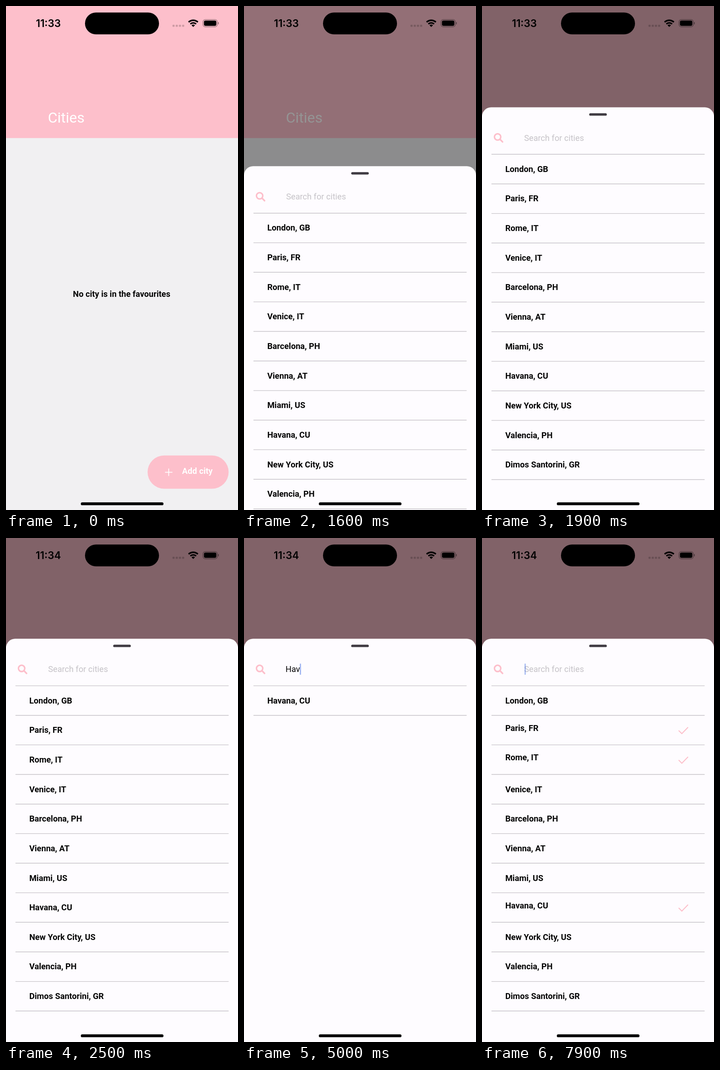
An HTML page with a canvas that plays this animation: 508x1102 px, repeating every 8 s.

```html
<!DOCTYPE html>
<html lang="en">
<head>
<meta charset="utf-8">
<title>Favourite cities</title>
<style>
  html, body { margin: 0; width: 100%; height: 100%; overflow: hidden; background: #f1f0f2; }
  canvas { display: block; width: 508px; height: 1102px; }
</style>
</head>
<body>
<canvas width="508" height="1102"></canvas>
<script>
const ctx = document.querySelector('canvas').getContext('2d');
const W = 508, H = 1102, LOOP = 8000;
const PINK = '#fdbfcb', INK = '#050505', PAPER = '#fefcff';
const SHEET_TOP = 220.3, ROW = 64.65;
const BOLD = '700 18.2px Roboto, sans-serif';
const REGULAR = '400 18.2px Roboto, sans-serif';
const CITIES = ['London, GB', 'Paris, FR', 'Rome, IT', 'Venice, IT', 'Barcelona, PH', 'Vienna, AT',
  'Miami, US', 'Havana, CU', 'New York City, US', 'Valencia, PH', 'Dimos Santorini, GR'];
// When each city is pressed and when its check mark appears.
const TAPS = {
  'Havana, CU': { press: 5010, check: 5200 },
  'Paris, FR': { press: 6640, check: 6790 },
  'Rome, IT': { press: 7440, check: 7590 }
};

const clamp = v => Math.min(1, Math.max(0, v));
const ramp = (t, from, to) => clamp((t - from) / (to - from));
const smooth = v => v * v * (3 - 2 * v);

function box(x, y, w, h, r, color) {
  ctx.fillStyle = color;
  ctx.beginPath();
  ctx.roundRect(x, y, w, h, r);
  ctx.fill();
}

function stroke(points, color, width) {
  ctx.strokeStyle = color;
  ctx.lineWidth = width;
  ctx.beginPath();
  points.forEach(([x, y]) => ctx.lineTo(x, y));
  ctx.stroke();
}

function arc(x, y, r, from, to, width, color) {
  ctx.strokeStyle = color;
  ctx.lineWidth = width;
  ctx.beginPath();
  ctx.arc(x, y, r, from, to);
  ctx.stroke();
}

function text(str, x, y, font, color, align = 'left') {
  ctx.font = font;
  ctx.fillStyle = color;
  ctx.textAlign = align;
  ctx.fillText(str, x, y);
}

function faded(alpha, draw) {
  ctx.save();
  ctx.globalAlpha = alpha;
  draw();
  ctx.restore();
}

// Opacity of something touched: quick dip to 0.2, then back to full.
function touchOpacity(t, press, release) {
  return 1 - 0.8 * (smooth(ramp(t, press, press + 100)) - smooth(ramp(t, release, release + 200)));
}

// Critically damped spring, 0 to 1.
function spring(ms) {
  const a = Math.max(0, ms) * 0.01826;
  return 1 - (1 + a) * Math.exp(-a);
}

function drawHome(t) {
  box(0, 0, W, H, 0, '#f1f0f2');
  box(0, 0, W, 288.8, 0, PINK);
  text('Cities', 91.7, 255.3, '400 32px Roboto, sans-serif', '#fff');
  text('No city is in the favourites', 253.2, 636.4, BOLD, INK, 'center');
  faded(touchOpacity(t, 1190, 1360), () => {
    box(310, 982.8, 177.5, 72.6, 36.3, PINK);
    stroke([[348.2, 1019.5], [364.4, 1019.5]], '#fff', 1.7);
    stroke([[356.3, 1011.4], [356.3, 1027.6]], '#fff', 1.7);
    text('Add city', 385.6, 1022.6, BOLD, '#fff');
  });
}

function drawStatus(t) {
  box(173, 14.3, 162, 47.8, 23.9, '#000');
  text(t < 2500 ? '11:33' : '11:34', 92.7, 46, '600 22.4px Inter, sans-serif', '#000', 'center');
  for (let i = 0; i < 4; i++) box(364.6 + i * 7, 41, 4.6, 4.6, 1.3, 'rgba(0,0,0,.19)');

  const up = -Math.PI / 2, spread = 0.76;
  for (const [r, width] of [[14.7, 3.4], [9.2, 3.2], [2.9, 5.4]])
    arc(410, 46, r, up - spread, up + spread, width, '#000');

  ctx.strokeStyle = 'rgba(0,0,0,.42)';
  ctx.lineWidth = 1.2;
  ctx.beginPath();
  ctx.roundRect(431.3, 29.6, 31.4, 16, 5);
  ctx.stroke();
  box(433.4, 31.7, 27.2, 11.8, 3.4, '#000');
  box(464.2, 35, 1.7, 5.2, 1, 'rgba(0,0,0,.42)');
}

function caretOpacity(t) {
  if (t < 2950) return 0;
  if (t < 3500) return ramp(t, 2950, 3050);
  if (t < 5200) return 1 - ramp(t, 4940, 5060);
  if (t < 5500) return 1;
  const p = t % 1000;
  return ramp(p, 150, 250) - ramp(p, 840, 950);
}

function drawRow(name, y, t) {
  const tap = TAPS[name];
  const checked = tap && t >= tap.check;
  faded(tap ? touchOpacity(t, tap.press, tap.check) : 1, () => {
    text(name, 50.9, y + (checked ? 33.9 : 38.5), BOLD, INK);
    if (checked) stroke([[430.6, y + 33.2], [437.6, y + 40], [451.2, y + 26]], PINK, 2.1);
    box(20.7, y + ROW - 0.7, 466.8, 1.4, 0, '#c7c4c9');
  });
}

function drawSheet(t) {
  const progress = spring(t - 1415);
  if (!progress) return;
  box(0, 0, W, H, 0, `rgba(0,0,0,${0.49 * progress})`);

  const query = t < 5200 ? 'Hav'.slice(0, t < 3500 ? 0 : t < 3700 ? 1 : t < 3900 ? 2 : 3) : '';
  ctx.save();
  ctx.translate(0, SHEET_TOP + (H - SHEET_TOP) * (1 - progress));
  box(0, 0, W, H, [20, 20, 0, 0], PAPER);
  box(234.7, 13, 38.6, 5.3, 2.6, '#3f3b42');

  arc(34.2, 64.8, 6.9, 0, 7, 3.3, PINK);
  ctx.lineCap = 'round';
  stroke([[39.6, 70.2], [45, 75.6]], PINK, 3.5);
  ctx.lineCap = 'butt';

  if (query) text(query, 91.1, 73.1, REGULAR, INK);
  else text('Search for cities', 92.2, 73.1, REGULAR, '#c6c3c8');
  const caretX = query ? 91.1 + ctx.measureText(query).width - 0.4 : 93.2;
  faded(caretOpacity(t), () => box(caretX, 54.2, 2.6, 24.6, 1.2, '#3a67e2'));

  box(20.7, 102.1, 466.8, 1.4, 0, '#c7c4c9');
  CITIES.filter(name => name.startsWith(query))
    .forEach((name, i) => drawRow(name, 102.8 + i * ROW, t));
  ctx.restore();
}

const start = performance.now();
function frame() {
  const t = (performance.now() - start) % LOOP;
  drawHome(t);
  drawSheet(t);
  drawStatus(t);
  box(163.8, 1085.2, 181, 6.4, 3.2, '#000');
  requestAnimationFrame(frame);
}
frame();
</script>
</body>
</html>
```
